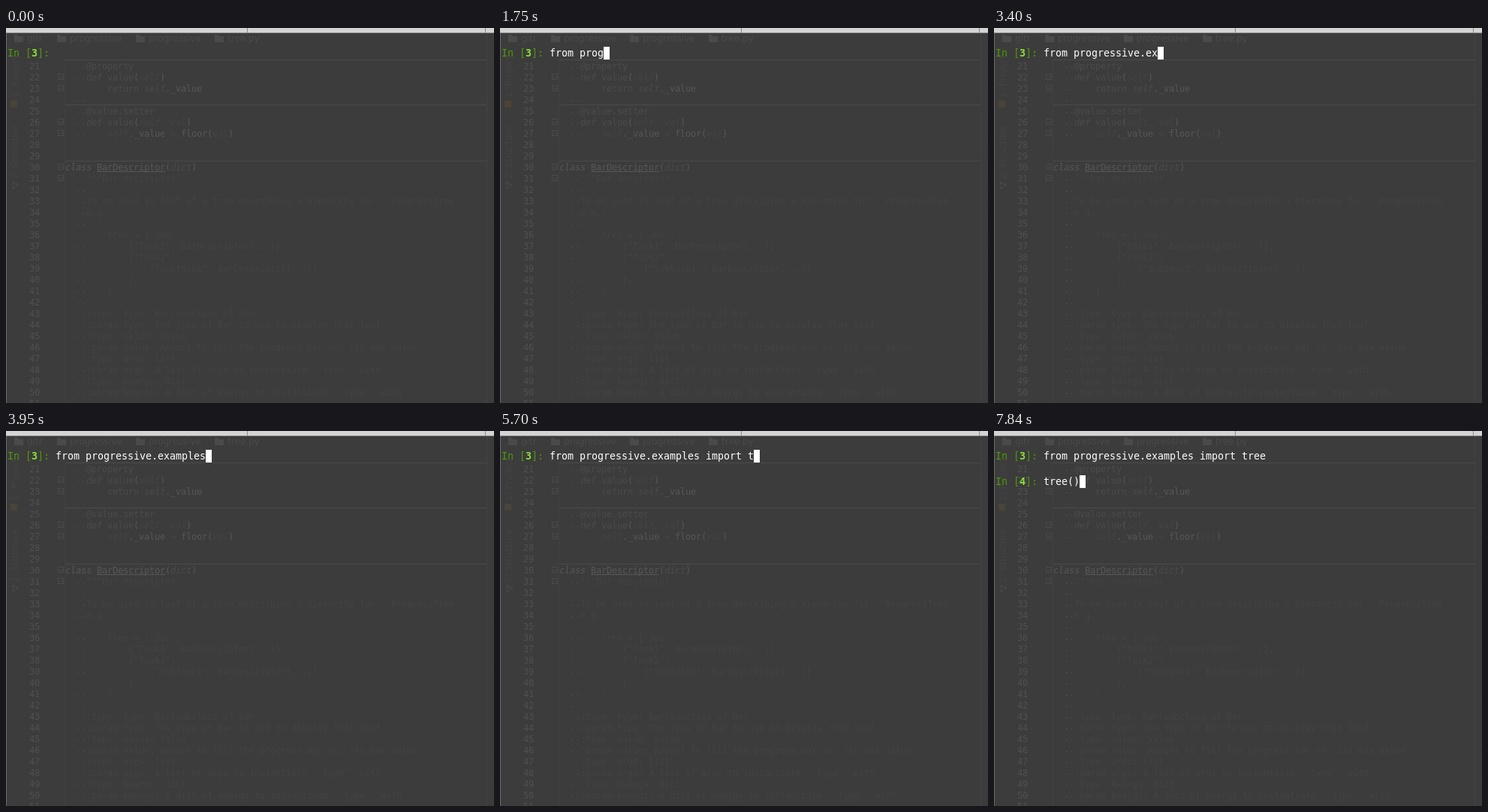
Recreate the animation shown at these times as an HTML page with a canvas. Size 650 by 500 pixels, loop 8000 ms.

```html
<!DOCTYPE html>
<html lang="en">
<head>
<meta charset="utf-8">
<title>Terminal typing</title>
<style>
html, body { margin: 0; width: 100%; height: 100%; overflow: hidden; background: #3c3c3c; }
canvas { display: block; }
</style>
</head>
<body>
<canvas id="stage" width="650" height="500"></canvas>
<script>
const LOOP = 8000;
const MONO = '"DejaVu Sans Mono", monospace';
const SANS = '"DejaVu Sans", sans-serif';
const BRIGHT = '#575757', MID = '#4b4b4b', DIM = '#444444', RULE = '#4a4a4a';

// Each typed chunk with the times at which its keys land.
const typed = [
  ['from pr', [680, 790, 900, 1010, 1120, 1230, 1340]],
  ['ogressive', [1620, 1750, 1920, 2027, 2133, 2240, 2347, 2453, 2560]],
  ['.exam', [3050, 3230, 3400, 3540, 3740]],
  [' import ', [4400, 4540, 4680, 4810, 4990, 5110, 5230, 5350]],
  ['tree', [5700, 5880, 6070, 6270]],
  ['\n', [6470]],
  ['tree()', [6810, 6980, 7040, 7500, 7800, 7840]]
];
const keys = typed.flatMap(([text, times]) => times.map((time, i) => ({ time, text: text[i] })));
keys.push({ time: 3950, text: 'ples' }); // tab completion
keys.sort((a, b) => a.time - b.time);
const CURSOR_ON = 570;

// Editor rows: line number, then [column, text, colour, style] runs.
const code = {
  21: [[4, '@property', MID]],
  22: [[4, 'def', MID, 'italic'], [8, 'value', MID], [13, '(', BRIGHT], [14, 'self', DIM, 'italic'], [18, ')', BRIGHT]],
  23: [[8, 'return', MID], [15, 'self', MID, 'italic'], [19, '._value', BRIGHT]],
  25: [[4, '@value.setter', MID]],
  26: [[4, 'def', MID, 'italic'], [8, 'value', MID], [13, '(', BRIGHT], [14, 'self, val', DIM, 'italic'], [23, ')', BRIGHT]],
  27: [[8, 'self', DIM, 'italic'], [12, '._value', BRIGHT], [20, '=', DIM], [22, 'floor(', BRIGHT], [28, 'val', DIM, 'italic'], [31, ')', BRIGHT]],
  30: [[0, 'class', BRIGHT, 'italic'], [6, 'BarDescriptor', BRIGHT], [19, '(', BRIGHT], [20, 'dict', MID, 'italic'], [24, ')', BRIGHT]]
};
const doc = {
  31: [4, '"""Bar descriptor'],
  33: [4, 'To be used in leaf of a tree describing a hierarchy for ``ProgressTree'],
  34: [4, 'e.g.:'],
  36: [8, "tree = {'Job':"],
  37: [12, '{"Task1": BarDescriptor(...)},'],
  38: [12, '{"Task2":'],
  39: [16, '{"Subtask1": BarDescriptor(...)}'],
  40: [12, '},'],
  41: [8, '}'],
  43: [4, ':type  type: Bar|subclass of Bar'],
  44: [4, ':param type: The type of Bar to use to display that leaf'],
  45: [4, ':type  value: Value'],
  46: [4, ':param value: Amount to fill the progress bar vs. its max value'],
  47: [4, ':type  args: list'],
  48: [4, ':param args: A list of args to instantiate ``type`` with'],
  49: [4, ':type  kwargs: dict'],
  50: [4, ':param kwargs: A dict of kwargs to instantiate ``type`` with']
};

const stage = document.getElementById('stage');
const ctx = stage.getContext('2d');

function rect(g, x, y, w, h, color) {
  g.fillStyle = color;
  g.fillRect(x, y, w, h);
}

// Text on a fixed character grid.
function put(g, text, x, y, step, color, font) {
  g.font = font;
  g.fillStyle = color;
  [...text].forEach((ch, i) => g.fillText(ch, x + i * step, y));
}

function label(g, text, x, y, color) {
  g.font = '12px ' + SANS;
  g.fillStyle = color;
  g.fillText(text, x, y);
}

function sideLabel(g, text, y) {
  g.save();
  g.translate(16, y);
  g.rotate(-Math.PI / 2);
  label(g, text, 0, 0, DIM);
  g.restore();
}

function folder(g, x) {
  rect(g, x, 9, 5, 2, RULE);
  rect(g, x, 11, 12, 8, RULE);
}

function drawEditor(g) {
  rect(g, 0, 0, 650, 500, '#3c3c3c');

  [[11, 'gitr'], [68, 'progressive'], [173, 'progressive'], [278, 'tree.py']].forEach(([x, name]) => {
    folder(g, x);
    label(g, name, x + 17, 18, RULE);
  });
  sideLabel(g, '1: Project', 93);
  sideLabel(g, '2: Structure', 202);
  rect(g, 6, 97, 9, 9, '#4a4438');
  rect(g, 8, 205, 4, 4, DIM);
  rect(g, 13, 207, 4, 4, DIM);
  rect(g, 8, 211, 4, 4, DIM);

  rect(g, 78, 42, 1, 458, '#404040');
  rect(g, 640, 7, 1, 493, '#434343');
  [42, 102, 177].forEach(y => rect(g, 79, y, 561, 1, RULE));

  const font = '12px ' + MONO;
  for (let n = 21; n <= 51; n++) {
    const y = 55 + (n - 21) * 15;
    put(g, String(n), 31, y, 7, '#505050', font);
    if (n < 28 || n > 30) {
      rect(g, 96, y - 3, 1, 1, BRIGHT);
      rect(g, 103, y - 3, 1, 1, BRIGHT);
    }
    for (const [col, text, color, style = ''] of code[n] || [])
      put(g, text, 79 + col * 7, y, 7, color, style + ' ' + font);
    if (doc[n]) put(g, doc[n][1], 79 + doc[n][0] * 7, y, 7, '#434343', font);
    if ([22, 23, 26, 27, 30, 31].includes(n)) {
      g.strokeStyle = RULE;
      g.strokeRect(69.5, y - 8.5, 7, 7);
      rect(g, 71, y - 5, 4, 1, RULE);
    }
  }
  rect(g, 121, 191, 91, 1, BRIGHT);
  for (let y = 36; y < 500; y += 15) rect(g, 648, y, 1, 1, '#2a2a2a');

  rect(g, 0, 0, 650, 6, '#d4d4d4');
  rect(g, 0, 6, 650, 1, '#8a8a8a');
  rect(g, 321, 0, 1, 6, '#8a8a8a');
  rect(g, 638, 0, 1, 6, '#8a8a8a');
  rect(g, 0, 7, 1, 493, '#6a6a6a');
}

function drawPrompt(number, text, row) {
  const y = 38 + row * 34;
  const font = '13.33px ' + MONO;
  put(ctx, 'In [', 2, y, 8, '#4e9a06', font);
  put(ctx, String(number), 34, y, 8, '#8ae234', 'bold ' + font);
  put(ctx, ']:', 42, y, 8, '#4e9a06', font);
  put(ctx, text, 66, y, 8, '#ffffff', font);
}

const backdrop = document.createElement('canvas');
backdrop.width = 650;
backdrop.height = 500;
drawEditor(backdrop.getContext('2d'));

function frame() {
  const t = performance.now() % LOOP;
  const lines = keys.filter(k => k.time <= t).map(k => k.text).join('').split('\n');
  ctx.drawImage(backdrop, 0, 0);
  lines.forEach((text, row) => drawPrompt(3 + row, text, row));
  if (t >= CURSOR_ON) {
    const row = lines.length - 1;
    rect(ctx, 66 + lines[row].length * 8, 25 + row * 34, 8, 17, '#ffffff');
  }
  requestAnimationFrame(frame);
}
frame();
</script>
</body>
</html>
```
